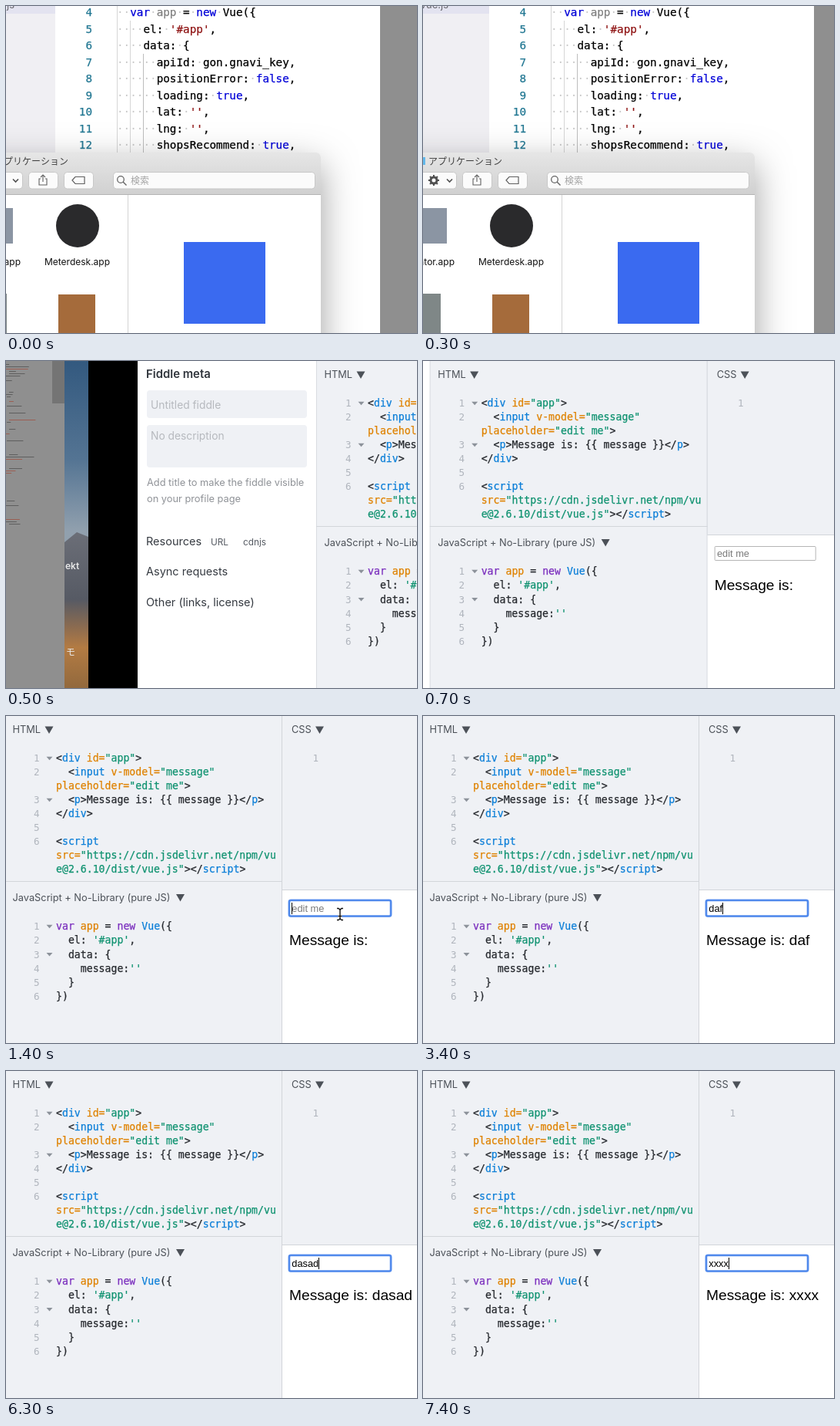
Animation of 534 by 424 pixels, one loop 7600 ms. Source, as an HTML page with a canvas:

```html
<!DOCTYPE html>
<html lang="en">
<head>
<meta charset="utf-8">
<title>Two-way binding demo</title>
<style>
html, body { margin: 0; width: 100%; height: 100%; overflow: hidden; background: #eff1f5; }
canvas { display: block; width: 534px; height: 424px; }
</style>
</head>
<body>
<canvas id="stage"></canvas>
<script>
const W = 534, H = 424, LOOP = 7600, STEP = 100;
const canvas = document.getElementById('stage');
const ctx = canvas.getContext('2d');
const dpr = window.devicePixelRatio || 1;
canvas.width = W * dpr;
canvas.height = H * dpr;

const UI = 'Inter, "Noto Sans", sans-serif';
const MONO = '"DejaVu Sans Mono", monospace';
const ARIAL = '"Liberation Sans", Arial, sans-serif';
const CJK = '"Noto Sans CJK JP", "Noto Sans CJK", sans-serif';

const SLIDE = 1405;        // distance between the two desktops
const TYPED = [
  [1900, 'd'], [2000, 'da'], [2200, 'daf'], [2300, 'dafd'], [2400, 'dafda'],
  [3200, 'dafd'], [3400, 'daf'], [3500, 'da'], [3600, 'd'], [3700, ''],
  [3900, 'd'], [4100, 'da'], [4300, 'das'], [4500, 'dasa'],
  [5200, 'dasad'], [5300, 'dasads'],
  [6300, 'dasad'], [6400, 'das'], [6500, 'd'], [6600, ''],
  [6800, 'x'], [7200, 'xx'], [7300, 'xxx'], [7400, 'xxxx']
];
const CARET_OFF = [[2900, 3200], [5000, 5200], [6000, 6300]];

function rect(x, y, w, h, color) {
  ctx.fillStyle = color;
  ctx.fillRect(x, y, w, h);
}

function round(x, y, w, h, r, fill, stroke, width = 1) {
  ctx.beginPath();
  ctx.roundRect(x, y, w, h, r);
  if (fill) { ctx.fillStyle = fill; ctx.fill(); }
  if (stroke) { ctx.strokeStyle = stroke; ctx.lineWidth = width; ctx.stroke(); }
}

function line(points, color, width = 1, close = false) {
  ctx.beginPath();
  points.forEach(([x, y], i) => i ? ctx.lineTo(x, y) : ctx.moveTo(x, y));
  if (close) ctx.closePath();
  ctx.strokeStyle = color;
  ctx.lineWidth = width;
  ctx.stroke();
}

function text(str, x, y, size, color, family = UI, align = 'left', weight = 400) {
  ctx.font = `${weight} ${size}px ${family}`;
  ctx.textAlign = align;
  ctx.fillStyle = color;
  ctx.fillText(str, x, y);
}

// monospace text, slightly thickened
function mono(str, x, y, size, color, align = 'left') {
  text(str, x, y, size, color, MONO, align);
  ctx.strokeStyle = color;
  ctx.lineWidth = .25;
  ctx.strokeText(str, x, y);
}

function triangle(x, y, w, h, color) {
  ctx.beginPath();
  ctx.moveTo(x, y);
  ctx.lineTo(x + w, y);
  ctx.lineTo(x + w / 2, y + h);
  ctx.fillStyle = color;
  ctx.fill();
}

// "~x" switches to the palette colour x
function code(str, x, y, size, palette) {
  const parts = str.split(/~(.)/);
  const step = size * 0.602;
  let col = parts[0].length;
  if (col) mono(parts[0], x, y, size, palette.d);
  for (let i = 1; i < parts.length; i += 2) {
    mono(parts[i + 1], x + col * step, y, size, palette[parts[i]]);
    col += parts[i + 1].length;
  }
}

function random(seed) {
  return () => (seed = (seed * 16807) % 2147483647) / 2147483647;
}

/* ---- first desktop ---- */

const EDITOR = { d: '#000', b: '#0000d8', r: '#8f1414', g: '#808080' };
const EDITOR_LINES = [
  '  ~bvar ~gapp ~d= ~bnew ~dVue({',
  "    el: ~r'#app'~d,",
  '    data: {',
  '      apiId: gon.gnavi_key,',
  '      positionError: ~bfalse~d,',
  '      loading: ~btrue~d,',
  "      lat: ~r''~d,",
  "      lng: ~r''~d,",
  '      shopsRecommend: ~btrue~d,'
];

function drawEditor() {
  rect(-300, 0, 364, H, '#f0eff3');
  rect(-300, 0, 364, 10, '#e3e3f0');
  rect(64, 0, 422, H, '#fff');
  text('vue.js', 11, 3.4, 13, '#66666c', UI, 'right');
  rect(144, 0, 1, 200, '#d6d6d6');
  rect(161, 19, 1, 180, '#d6d6d6');
  rect(178, 62, 1, 140, '#bdbdbd');
  EDITOR_LINES.forEach((str, i) => {
    const y = 13.2 + i * 21.5;
    mono(i + 4, 112, y, 14.3, '#237893', 'right');
    const dots = str.replace(/~./g, '').replace(/\S/g, '_').replace(/ /g, '·').replace(/_/g, ' ');
    text(dots, 144, y, 14.3, '#c9c9c9', MONO);
    code(str, 144, y, 14.3, EDITOR);
  });
}

function drawToolbar() {
  const bar = ctx.createLinearGradient(0, 190, 0, 245);
  bar.addColorStop(0, '#e6e6e6');
  bar.addColorStop(1, '#d0d0d0');
  round(-300, 190, 709, 55, [0, 6, 0, 0], bar);
  rect(-300, 244, 709, 1, '#b4b4b4');
  rect(-28, 196, 9, 10, '#62b8ea');
  text('アプリケーション', -15, 205.5, 12, '#404040', CJK);

  const button = (x, w) => round(x + .5, 215.5, w - 1, 21.5, 4, '#fbfbfb', '#c8c8c8');
  button(-34, 56);
  button(29, 39);
  button(75, 39);
  button(139, 263);

  ctx.beginPath();
  ctx.arc(-8, 226, 4, 0, 7);
  ctx.strokeStyle = '#505050';
  ctx.lineWidth = 3;
  ctx.stroke();
  for (let i = 0; i < 8; i++) {
    const c = Math.cos(i * Math.PI / 4), s = Math.sin(i * Math.PI / 4);
    line([[-8 + c * 4, 226 + s * 4], [-8 + c * 7, 226 + s * 7]], '#505050', 2);
  }
  line([[9, 224.5], [12.5, 228], [16, 224.5]], '#505050', 1.6);
  line([[45, 224], [43, 224], [43, 232], [53, 232], [53, 224], [51, 224]], '#606060', 1.1);
  line([[48, 228], [48, 219.5]], '#606060', 1.1);
  line([[45, 222], [48, 219], [51, 222]], '#606060', 1.1);
  line([[86, 226], [90, 221.5], [102, 221.5], [102, 230.5], [90, 230.5]], '#606060', 1.2, true);
  ctx.beginPath();
  ctx.arc(149, 225, 4.3, 0, 7);
  ctx.strokeStyle = '#666';
  ctx.lineWidth = 1.3;
  ctx.stroke();
  line([[152, 228], [156.5, 232.5]], '#666', 1.4);
  text('検索', 162, 230.5, 12, '#a3a3a3', CJK);
}

function drawFinder() {
  ctx.save();
  ctx.shadowColor = 'rgba(0,0,0,.38)';
  ctx.shadowBlur = 46 * dpr;
  ctx.shadowOffsetY = 16 * dpr;
  round(-300, 190, 709, 400, 6, '#fff');
  ctx.restore();
  drawToolbar();
  rect(158, 245, 1, H, '#d4d4d4');

  rect(-40, 262, 49, 46, '#8b95a3');
  rect(-44, 373, 45, 51, '#7f8787');
  ctx.beginPath();
  ctx.arc(93, 285, 28, 0, 7);
  ctx.fillStyle = '#2a2a2c';
  ctx.fill();
  rect(68, 374, 48, 50, '#a56b3b');
  rect(231, 306, 106, 106, '#3a6af0');
  text('ator.app', 19, 335.5, 12, '#111', UI, 'right');
  text('Meterdesk.app', 92.5, 335.5, 12, '#111', UI, 'center');
}

function drawDesktopEdge() {
  rect(486, 0, 590, H, '#8f8f8f');
  const rnd = random(77);
  for (let y = 4; y < 212; y += 3) {
    const indent = Math.floor(rnd() * 3) * 3, len = 5 + rnd() * rnd() * 50, pick = rnd();
    if (pick < .62 && y > 20) continue;
    ctx.globalAlpha = .6;
    rect(998 + indent, y, len, 1, pick > .9 ? '#a3402c' : '#3f3f3f');
    ctx.globalAlpha = 1;
  }
  rect(1060, 0, 16, 55, '#747474');

  const sky = ctx.createLinearGradient(0, 0, 0, H);
  sky.addColorStop(0, '#33597f');
  sky.addColorStop(.3, '#547493');
  sky.addColorStop(.52, '#91a0ae');
  rect(1076, 0, 31, H, sky);
  const land = ctx.createLinearGradient(0, 215, 0, H);
  land.addColorStop(0, '#6d7079');
  land.addColorStop(.45, '#565a64');
  land.addColorStop(.62, '#8b6b50');
  land.addColorStop(.75, '#b37b43');
  land.addColorStop(1, '#92693d');
  ctx.beginPath();
  ctx.moveTo(1076, 235);
  ctx.lineTo(1092, 222);
  ctx.lineTo(1107, 228);
  ctx.lineTo(1107, H);
  ctx.lineTo(1076, H);
  ctx.fillStyle = land;
  ctx.fill();
  text('ekt', 1077, 270, 12, '#e8e8e8', UI, 'left', 600);
  text('モ', 1078, 382, 12, '#e8e8e8', CJK);
  rect(1107, 0, 64, H, '#000');
}

/* ---- second desktop ---- */

const FIDDLE = { d: '#26292e', b: '#0c7fd8', o: '#df8200', g: '#0f9270', p: '#7b2fbe' };
const HTML_LINES = [
  '<~bdiv ~oid=~g"app"~d>',
  '  <~binput ~ov-model=~g"message"',
  '~oplaceholder=~g"edit me"~d>',
  '  <~bp~d>Message is: {{ message }}</~bp~d>',
  '</~bdiv~d>',
  '',
  '<~bscript',
  '~osrc=~g"https://cdn.jsdelivr.net/npm/vu',
  '~ge@2.6.10/dist/vue.js"~d></~bscript~d>'
];
const JS_LINES = [
  '~pvar ~oapp ~d= ~pnew ~bVue~d({',
  "  el: ~g'#app'~d,",
  '  data: {',
  "    message:~g''",
  '  }',
  '})'
];

function listing(lines, numbers, top, step) {
  lines.forEach((str, i) => {
    const y = top + i * step;
    if (numbers[i]) text(numbers[i], 43.5, y, 12.6, '#b0b5bd', MONO, 'right');
    if (numbers[i] === 1 || numbers[i] === 3) triangle(52.5, y - 6.5, 8, 4.5, '#8c929a');
    code(str, 65, y, 13.2, FIDDLE);
  });
}

function drawSidebar() {
  rect(-234, 0, 232, H, '#fff');
  rect(-2, 0, 1, H, '#d9dce1');
  round(-222, 38, 208, 36, 4, '#eff1f5');
  round(-222, 83, 208, 55, 4, '#eff1f5');
  text('Fiddle meta', -223, 22, 14.9, '#30353c', UI, 'left', 600);
  text('Untitled fiddle', -217, 61.5, 13.8, '#b6b9be');
  text('No description', -217, 102, 13.8, '#b6b9be');
  text('Add title to make the fiddle visible', -222, 162, 12.8, '#8f9297');
  text('on your profile page', -222, 183, 12.8, '#8f9297');
  text('Resources', -223, 238.5, 14.5, '#363b42');
  text('URL', -139, 239, 11.8, '#555a62');
  text('cdnjs', -97, 239, 11.8, '#555a62');
  text('Async requests', -223, 277.5, 14.5, '#363b42');
  text('Other (links, license)', -223, 317.5, 14.5, '#363b42');
}

function drawPanes() {
  rect(-2, 0, 1400, H, '#eff1f5');
  drawSidebar();
  rect(-2, 214, 361, 1, '#d2d5da');
  rect(358, 0, 1, H, '#d2d5da');
  rect(359, 225, 700, 1, '#d2d5da');
  rect(359, 226, 700, H, '#fff');

  text('HTML', 8.5, 22.3, 12.8, '#4c5158');
  triangle(50.5, 13.5, 11, 9.5, '#4c5158');
  text('CSS', 371, 22.3, 12.8, '#4c5158');
  triangle(402, 13.5, 11, 9.5, '#4c5158');
  text('JavaScript + No-Library (pure JS)', 8.5, 239.8, 12.8, '#4c5158');
  triangle(221, 231, 11, 9.5, '#4c5158');

  listing(HTML_LINES, [1, 2, 0, 3, 4, 5, 6], 59.3, 17.95);
  listing(JS_LINES, [1, 2, 3, 4, 5, 6], 277.3, 18.1);
  text('1', 406, 59.3, 12.6, '#b0b5bd', MONO, 'right');
}

function drawResult(t) {
  let value = '';
  for (const [at, str] of TYPED) if (t >= at) value = str;
  const focused = t >= 1300;
  if (focused) {
    round(366.5, 237.5, 135, 23.5, 4, '#c3d8fb');
    round(368, 239, 132, 20.5, 2, '#fff', '#5089ec', 2.6);
  } else {
    round(368.5, 240.5, 131, 18, 1, '#fff', '#b5b5b5');
  }
  if (value) text(value, 371.3, 253.8, 12.8, '#000', ARIAL);
  else text('edit me', 371.3, 253.8, 12.8, '#7a7a7a', ARIAL);

  if (focused && !CARET_OFF.some(([a, b]) => t >= a && t < b)) {
    ctx.font = `12.8px ${ARIAL}`;
    const end = value ? ctx.measureText(value).width : 0;
    rect(Math.round(371.3 + end), 242, 1, 15, '#000');
  }
  text('Message is: ' + value, 368, 296.7, 19.2, '#000', ARIAL);
}

function drawPointer(t) {
  if (t < 900 || t >= 1900) return;
  const left = Math.pow(1 - Math.min(1, (t - 900) / 400), 2);
  const x = 434 + 12 * left, y = 257 + 46 * left;
  for (const [color, width] of [['#fff', 3.4], ['#111', 1.4]]) {
    line([[x, y - 6], [x, y + 6]], color, width);
    line([[x - 4, y - 7.5], [x - 2, y - 7.5], [x, y - 6], [x + 2, y - 7.5], [x + 4, y - 7.5]], color, width);
    line([[x - 4, y + 7.5], [x - 2, y + 7.5], [x, y + 6], [x + 2, y + 7.5], [x + 4, y + 7.5]], color, width);
    line([[x - 2.5, y + 2.5], [x + 2.5, y + 2.5]], color, width);
  }
}

// small pull to the right, then a fast swipe that settles
function slideAt(t) {
  if (t <= 300) return 22 * Math.sin(t / 300 * Math.PI / 2);
  if (t <= 500) return 22 - 1022 * Math.pow((t - 300) / 200, 1.3);
  if (t > 1000) return -SLIDE;
  return -SLIDE + 405 * Math.exp((500 - t) / 55);
}

function draw(t) {
  const x = slideAt(t);
  ctx.setTransform(dpr, 0, 0, dpr, 0, 0);
  ctx.translate(x, 0);
  if (x > -900) {
    drawEditor();
    // the grey area lies under the window's shadow
    drawDesktopEdge();
    drawFinder();
  } else if (x > -1200) {
    drawDesktopEdge();
  }
  ctx.translate(SLIDE, 0);
  if (x < -600) {
    drawPanes();
    drawResult(t);
  }
  drawPointer(t);
}

const start = performance.now();
function tick(now) {
  const t = Math.max(0, now - start) % LOOP;
  draw(Math.floor((t + 4) / STEP) * STEP % LOOP);
  requestAnimationFrame(tick);
}
draw(0);
requestAnimationFrame(tick);
</script>
</body>
</html>
```
